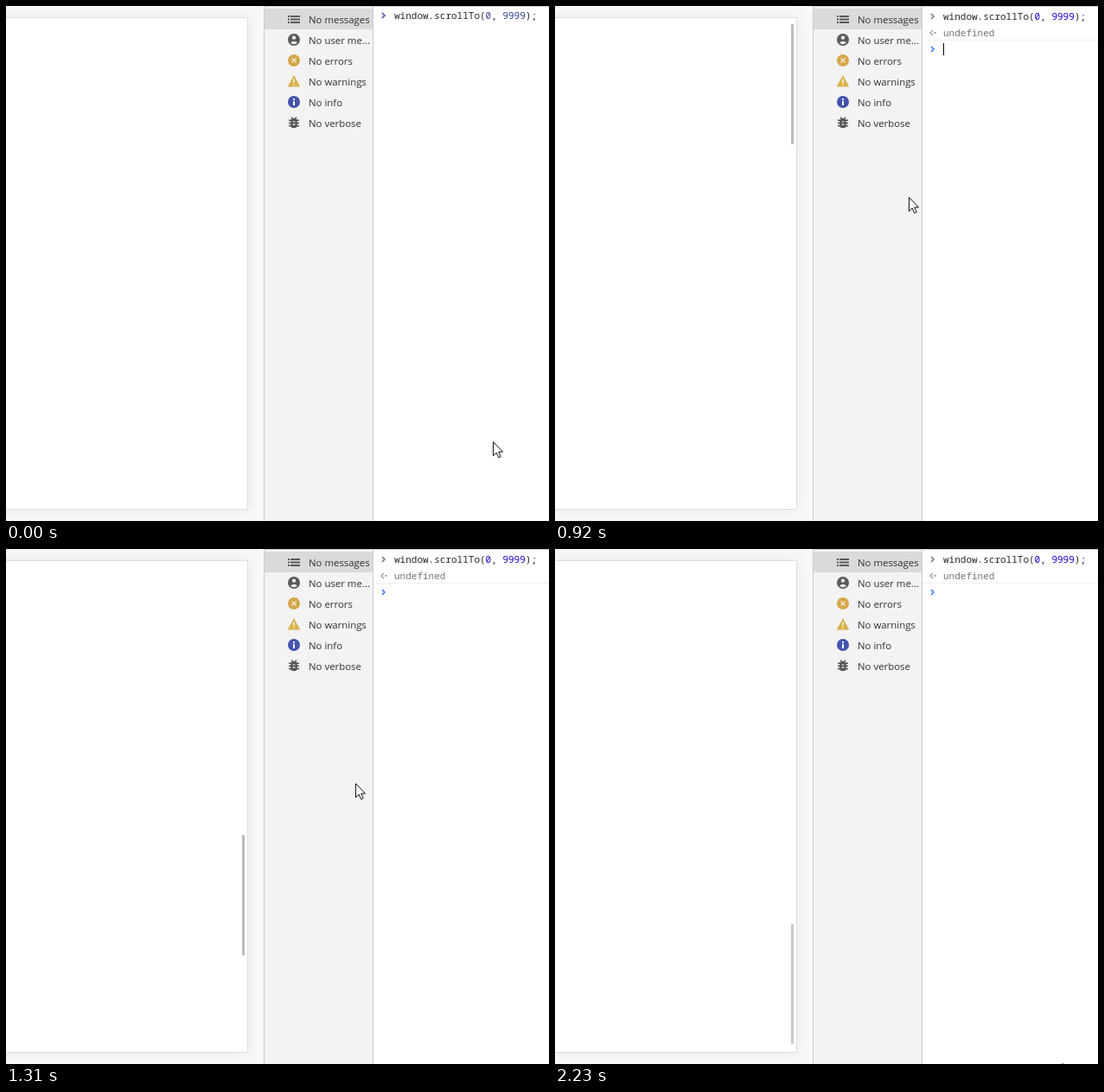
An HTML page for the animation above (2380 ms loop, 628x596 px).

```html
<!DOCTYPE html>
<html lang="en">
<head>
<meta charset="utf-8">
<title>Smooth scroll from the console</title>
<style>
  html, body { margin: 0; width: 100%; height: 100%; overflow: hidden; background: #f8f8f8; }
  svg { display: block; width: 628px; height: 596px; }
  .page { fill: #fff; stroke: #dfdfdf; filter: drop-shadow(0 0 7px rgba(0, 0, 0, .07)); }
  .labels { font: 11.4px "Open Sans", "Noto Sans", sans-serif; fill: #303030; }
  .code { font: 11px "Noto Sans Mono", "DejaVu Sans Mono", monospace; fill: #262626; white-space: pre; }
  .chevron { fill: none; stroke-width: 1.5; }
  .arrow { fill: #fff; stroke: #111; stroke-linejoin: round; }
  .beam { fill: none; stroke: #222; }
</style>
</head>
<body>
<svg viewBox="0 0 628 596">
  <defs>
    <clipPath id="view"><rect y="14" width="279" height="568"/></clipPath>
    <path id="chevron" class="chevron" d="M-2-3 1 0-2 3"/>
  </defs>

  <rect class="page" x="-20.5" y="13.5" width="300" height="569"/>
  <g clip-path="url(#view)">
    <rect id="box" x="69" width="100" height="100" fill="#f00"/>
    <rect id="thumb" x="273" width="3" height="139"/>
  </g>

  <rect x="298" width="127" height="596" fill="#f3f3f3"/>
  <rect x="299" y="3" width="125" height="24" fill="#dadada"/>
  <rect x="425" width="203" height="596" fill="#fff"/>
  <path d="M298.5 0V596M424.5 0V596M299 .5H628" stroke="#ccc"/>

  <g id="labels" class="labels"></g>

  <g fill="#5a5a5a">
    <path d="M326 11h2v2h-2zm3 0h11v2h-11zm-3 3.5h2v2h-2zm3 0h11v2h-11zm-3 3.5h2v2h-2zm3 0h11v2h-11z"/>
    <circle cx="333" cy="39" r="7"/>
    <path d="M329 42.5Q333 38.8 337 42.5Q333 46 329 42.5Z" fill="#f3f3f3"/>
    <circle cx="333" cy="36.6" r="2.2" fill="#f3f3f3"/>
  </g>
  <g stroke="#f6efdf" stroke-width="1.3">
    <circle cx="333" cy="63" r="7" fill="#d6a648" stroke="none"/>
    <path d="M330.5 60.5l5 5m0-5l-5 5"/>
    <path d="M333 80l7.3 13.5h-14.6z" fill="#d7b34c" stroke="none"/>
    <path d="M333 84.5v4.5m0 1.3v1.5" stroke-width="1.6"/>
  </g>
  <circle cx="333" cy="111" r="7" fill="#4254ae"/>
  <path d="M333 107v2m0 1v5" stroke="#fff" stroke-width="2"/>
  <g stroke="#555" stroke-width="1.6">
    <rect x="329.2" y="130" width="7.6" height="11.3" rx="3.6" fill="#555" stroke="none"/>
    <path d="M327 132.3h12M327 135.5h12M327 138.7h12M330 128.8l2 2m4-2l-2 2"/>
    <path d="M331.5 134h3m-3 3.2h3" stroke="#f3f3f3" stroke-width="1.2"/>
  </g>

  <g class="code">
    <g id="typed">
      <use href="#chevron" x="437" y="11" stroke="#3f51b5"/>
      <text x="449" y="15">window.scrollTo(<tspan fill="#303f8f">0</tspan>, <tspan fill="#303f8f">9999</tspan>);</text>
    </g>
    <g id="logged">
      <use href="#chevron" x="437" y="12" stroke="#777"/>
      <text x="449" y="16">window.scrollTo(<tspan fill="#1c00cf">0</tspan>, <tspan fill="#1c00cf">9999</tspan>);</text>
      <path class="chevron" d="M437 28l-3 3 3 3" stroke="#999" style="stroke-width:1.2"/>
      <rect x="438.5" y="30" width="2" height="2" fill="#999"/>
      <text x="449" y="35" fill="#777">undefined</text>
      <path d="M425 39.5H628" stroke="#f0f0f0"/>
      <use href="#chevron" x="437" y="50" stroke="#367cf1"/>
    </g>
  </g>
  <rect id="caret" width="1" height="14" fill="#000"/>

  <g id="pointer">
    <path class="arrow" d="M.5.5V16.5L4.2 13L6.7 18.7L9.2 17.6L6.7 12H11.5Z"/>
    <path class="beam" d="M0 .5h2.5l1 1 1-1H7M3.5 1.5v13M0 15.5h2.5l1-1 1 1H7"/>
  </g>
</svg>

<script>
  const LOOP = 2380, ENTER = 770, SCROLL_START = 912, SCROLL_TIME = 595;

  // time, pointer x, pointer y; each row holds until the next
  const path = [
    [0, 563, 504], [70, 557, 445], [150, 527, 270], [220, 483, 95], [300, 454, 8],
    [450, 476, 22], [620, 514, 35], [690, 511, 46], [770, 494, 84], [850, 450, 157],
    [920, 409, 221], [1000, 409, 221], [1080, 408, 221], [1150, 400, 237],
    [1230, 402, 259], [1310, 404, 271], [1380, 406, 280], [1460, 409, 287],
    [1540, 410, 290], [1610, 413, 299], [1690, 428, 338], [1770, 457, 405],
    [1840, 497, 494], [1920, 537, 578], [2230, 587, 595]
  ];

  const el = id => document.getElementById(id);
  const show = (node, on) => node.setAttribute('visibility', on ? 'visible' : 'hidden');
  const within = (t, from, to) => t >= from && t < to;
  const [arrow, beam] = el('pointer').children;

  ['No messages', 'No user me...', 'No errors', 'No warnings', 'No info', 'No verbose']
    .forEach((label, i) => {
      const text = document.createElementNS('http://www.w3.org/2000/svg', 'text');
      text.setAttribute('x', 350);
      text.setAttribute('y', 20 + 24 * i);
      text.textContent = label;
      el('labels').append(text);
    });

  function scrollAt(t) {
    const p = Math.min(1, Math.max(0, (t - SCROLL_START) / SCROLL_TIME));
    return (1 - Math.cos(Math.PI * p)) / 2;
  }

  function draw(time) {
    const [t, x, y] = path.findLast(row => row[0] <= time);
    const entered = t >= ENTER, settled = t >= 1920;
    const scroll = scrollAt(t);

    el('pointer').setAttribute('transform', `translate(${x} ${y})`);
    const overText = within(t, 300, 450);
    show(arrow, !overText);
    show(beam, overText);

    show(el('typed'), !entered);
    show(el('logged'), entered);
    el('caret').setAttribute('x', entered ? 449 : 614);
    el('caret').setAttribute('y', entered ? 43 : 4);
    show(el('caret'), within(t, 450, 1310) || within(t, 1770, 2230));

    el('box').setAttribute('y', Math.round(1081.4 - 1677 * scroll));
    el('thumb').setAttribute('y', Math.round(21 + 412 * scroll) + settled);
    el('thumb').setAttribute('fill', settled ? '#c9c9c9' : '#bbb');
    show(el('thumb'), t >= 920);
  }

  const start = performance.now();
  function tick() {
    draw((performance.now() - start) % LOOP);
    requestAnimationFrame(tick);
  }
  tick();
</script>
</body>
</html>
```
